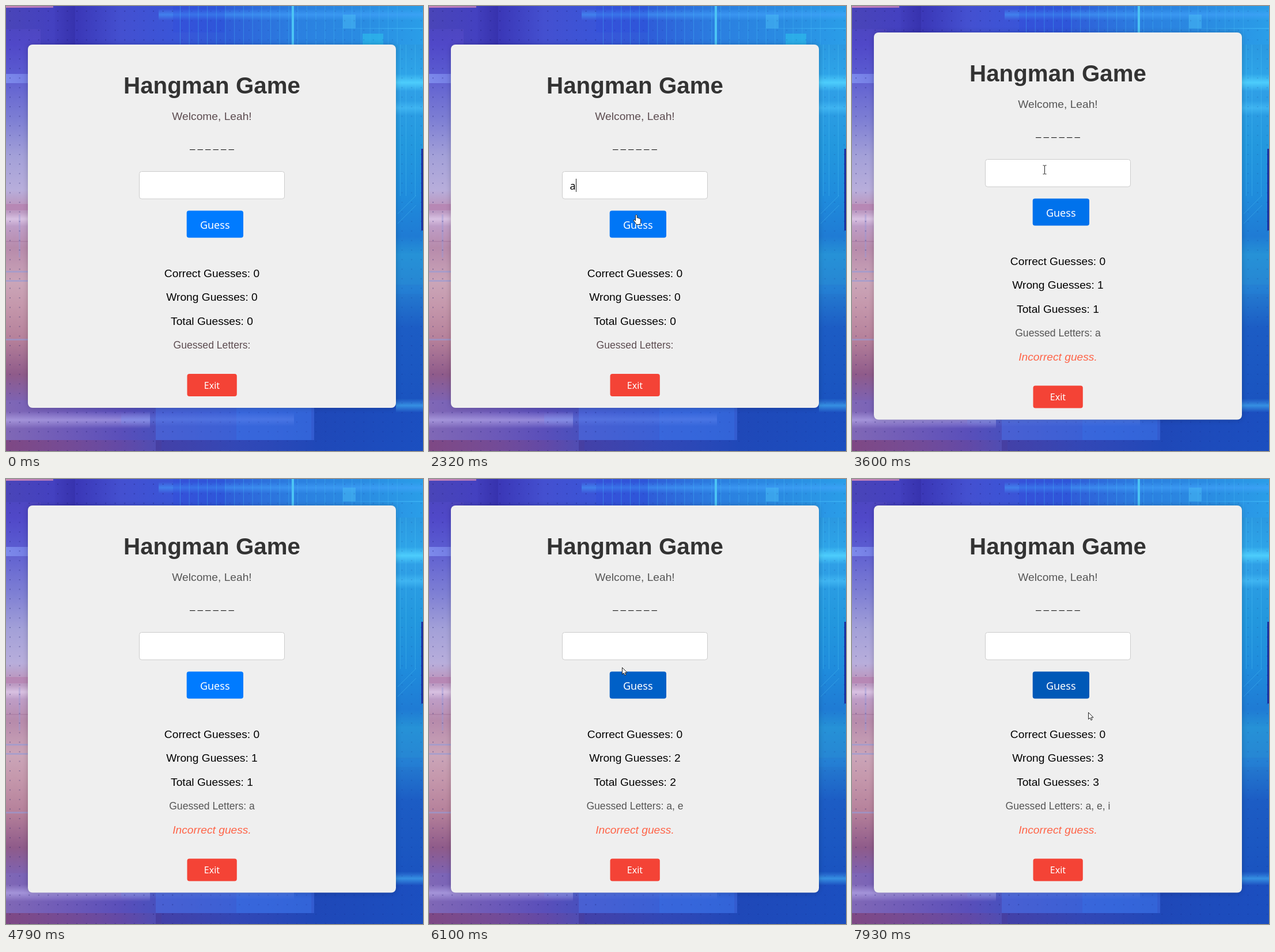
An HTML page with a canvas for the animation above (8000 ms loop, 724 px wide and 773 px high).

```html
<!DOCTYPE html>
<html lang="en">
<head>
<meta charset="utf-8">
<title>Hangman Game</title>
<style>
  html, body { margin: 0; width: 100%; height: 100%; overflow: hidden; background: #2a6fd8; }
  canvas { display: block; }
</style>
</head>
<body>
<canvas id="stage" width="724" height="773"></canvas>
<script>
const W = 724, H = 773, LOOP = 8000, MID = 357.5;
const ARIAL = '"Liberation Sans", Arial, sans-serif';
const UI = '"Noto Sans", "Open Sans", sans-serif';
const stage = document.getElementById('stage').getContext('2d');

// Scene steps: time, typed text, caret, letters guessed so far
const steps = [
  [0, '', 0, ''], [2010, '', 1, ''], [2130, 'a', 1, ''], [2690, '', 0, 'a'],
  [3930, '', 1, 'a'], [4460, '', 0, 'a'], [4880, 'e', 1, 'a'], [5370, '', 0, 'ae'],
  [6570, '', 1, 'ae'], [6840, 'i', 1, 'ae'], [7650, '', 0, 'aei']
];
// Pointer path: time, x, y
const path = [
  [70, 622, 735], [840, 346, 301], [900, 346, 301], [1250, 393, 532], [1670, 366, 318],
  [1800, 366, 318], [1870, 366, 324], [2130, 366, 324], [2320, 359, 362], [2700, 359, 364],
  [3320, 359, 364], [3520, 346, 301], [3700, 319, 262], [3990, 321, 291], [4460, 321, 291],
  [4520, 323, 294], [4950, 323, 294], [5250, 360, 365], [5900, 360, 365], [6100, 335, 327],
  [6640, 331, 303], [7030, 331, 303], [7450, 374, 364], [7720, 374, 364], [7790, 380, 370],
  [7930, 410, 405]
];
const hidden = [[0, 70], [4790, 4950], [6840, 6980]];
const hovers = [[2255, 1], [3400, -1], [5130, 1], [6000, -1], [7240, 1], [7890, -1]];

const clamp = v => Math.max(0, Math.min(1, v));
const smooth = v => { v = clamp(v); return v * v * (3 - 2 * v); };

function gradient(g, x0, y0, x1, y1, stops) {
  const grad = g.createLinearGradient(x0, y0, x1, y1);
  const length = Math.max(x1 - x0, y1 - y0);
  for (const [at, color] of stops) grad.addColorStop(at / length, color);
  return grad;
}

function backdrop() {
  const canvas = document.createElement('canvas');
  canvas.width = W; canvas.height = H;
  const g = canvas.getContext('2d');
  const rect = (x, y, w, h, fill) => { g.fillStyle = fill; g.fillRect(x, y, w, h); };
  // Streak of light that fades from one end to the other
  const streak = (x, y, w, h, rgb, a, b) =>
    rect(x, y, w, h, gradient(g, x, 0, x + w, 0, [[0, `rgba(${rgb},${a})`], [w, `rgba(${rgb},${b})`]]));
  // Horizontal band with soft upper and lower edges
  const glow = (x, y, w, h, rgb, a) =>
    rect(x, y, w, h, gradient(g, 0, y, 0, y + h,
      [[0, `rgba(${rgb},0)`], [h / 2, `rgba(${rgb},${a})`], [h, `rgba(${rgb},0)`]]));

  rect(0, 0, W, H, gradient(g, 0, 0, W, 0, [
    [0, '#4a45b8'], [80, '#4441c0'], [125, '#3b38b8'], [200, '#4450d0'], [290, '#3a55d8'],
    [380, '#2f5cd8'], [500, '#2b7fe0'], [620, '#2a8ce2'], [W, '#2a9ee8']]));
  rect(0, 40, 60, H - 40, gradient(g, 0, 0, 0, H, [
    [0, '#4a45b8'], [67, '#5048c8'], [115, '#5a5ad0'], [200, '#7f80d4'], [260, '#a3a0d8'],
    [320, '#b8aedb'], [345, '#bb98c0'], [380, '#bf9fc8'], [420, '#b78bab'], [480, '#cba5b8'],
    [520, '#c598ac'], [580, '#b5809a'], [640, '#8f5b8a'], [690, '#7c63b5'], [H, '#7a4f85']]));
  rect(660, 67, 64, H - 67, gradient(g, 0, 0, 0, H, [
    [0, '#2a8fe4'], [60, '#2a97e0'], [120, '#2ea4e8'], [150, '#2f9fe6'], [240, '#2398de'],
    [330, '#1f8cdc'], [400, '#1f7bd4'], [430, '#2590d6'], [485, '#2580d2'], [560, '#1c5cc4'],
    [680, '#1a54c0'], [H, '#1b46b4']]));
  rect(0, 685, W, 88, gradient(g, 0, 0, W, 0, [
    [0, '#8068b6'], [100, '#6f5bb8'], [200, '#5a4fba'], [258, '#4a50bd'], [400, '#2f4fc2'],
    [540, '#1f48b8'], [W, '#1b4fc0']]));

  // Upper edge
  streak(0, 0, 82, 3, '215,140,185', .9, .7);
  streak(85, 0, 35, 67, '40,30,140', .05, .25);
  glow(265, 5, 459, 20, '70,165,255', .55);
  rect(290, 0, 90, 46, 'rgba(40,70,220,.25)');
  for (let x = 302; x < 680; x += 15.7) rect(x, 0, 1, 67, 'rgba(70,185,245,.42)');
  rect(496, 0, 4, 67, '#4cc4f4');
  rect(585, 15, 22, 24, 'rgba(75,190,245,.5)');
  rect(619, 48, 36, 19, 'rgba(45,185,235,.7)');
  streak(560, 38, 164, 2, '70,190,250', 0, .5);

  // Left edge
  streak(0, 118, 40, 16, '140,160,250', .65, .45);
  rect(0, 344, 40, 11, 'rgba(180,120,170,.5)');
  glow(0, 358, 40, 24, '225,205,235', .75);
  rect(0, 408, 40, 2, 'rgba(160,110,150,.4)');
  rect(22, 362, 3, 75, 'rgba(150,150,215,.4)');
  for (const y of [460, 476, 578]) rect(0, y, 38, 3, 'rgba(150,155,215,.6)');

  // Right edge
  glow(677, 118, 47, 30, '80,210,255', .9);
  glow(677, 164, 47, 26, '75,195,250', .6);
  rect(677, 430, 47, 54, 'rgba(40,150,215,.25)');
  rect(677, 486, 47, 14, 'rgba(35,130,215,.4)');
  glow(677, 682, 47, 24, '60,160,235', .8);
  rect(721, 248, 3, 142, '#1b2fa0');
  g.strokeStyle = 'rgba(80,200,245,.35)';
  g.lineWidth = 1;
  g.beginPath();
  for (const x of [684.5, 694.5, 710.5]) { g.moveTo(x, 67); g.lineTo(x, 330); }
  for (const y of [345, 362]) { g.moveTo(680, y + 16); g.lineTo(712, y - 16); }
  g.stroke();

  // Lower edge
  glow(0, 704, 250, 30, '195,185,245', .55);
  rect(260, 698, 275, 56, 'rgba(75,115,235,.45)');
  rect(400, 698, 130, 56, 'rgba(50,120,235,.3)');
  glow(200, 706, 300, 24, '110,145,245', .35);
  streak(0, 754, 270, 19, '125,55,105', .65, .1);
  streak(260, 754, 280, 19, '60,45,140', .45, 0);

  for (let y = 8; y < H; y += 16.6)
    for (let x = 6; x < W; x += 16.6)
      rect(x, y, 2, 2, `rgba(20,20,100,${x < 300 ? .3 : .13})`);
  return canvas;
}

function box(x, y, w, h, r, fill, stroke) {
  stage.beginPath();
  stage.roundRect(x, y, w, h, r);
  stage.fillStyle = fill;
  stage.fill();
  if (stroke) { stage.strokeStyle = stroke; stage.lineWidth = 1; stage.stroke(); }
}

function text(str, x, y, font, color, align = 'center') {
  stage.font = font;
  stage.textAlign = align;
  stage.fillStyle = color;
  stage.fillText(str, x, y);
}

const arrow = new Path2D('M.5 .5V12.3L3.2 9.9L5 14L7 13.1L5.2 9.2H9Z');
const hand = new Path2D('M3.5 1.5Q5 -.5 6.2 1.5V6Q8 5 8.6 6.8Q10.2 6 10.8 7.6Q12.5 7.2 12.6 9V12Q12.4 15 11 17.5H5Q3.5 14 .2 11Q-.3 9 1.6 9.2L3.5 11Z');
const beam = new Path2D('M-3 -7.5H-1Q0 -7.5 0 -6.5Q0 -7.5 1 -7.5H3M0 -6.5V6.5M-3 7.5H-1Q0 7.5 0 6.5Q0 7.5 1 7.5H3');

function pointer(t, top) {
  if (hidden.some(([a, b]) => t >= a && t < b)) return;
  let i = path.findIndex(p => p[0] > t);
  if (i < 0) i = path.length - 1;
  const [t0, x0, y0] = path[i - 1], [t1, x1, y1] = path[i];
  const k = smooth((t - t0) / (t1 - t0));
  const x = x0 + (x1 - x0) * k, y = y0 + (y1 - y0) * k;
  const inside = (l, u, w, h) => x >= l && x <= l + w && y >= u && y <= u + h;
  stage.save();
  stage.translate(x, y);
  stage.lineWidth = 1;
  stage.strokeStyle = '#222';
  if (inside(231, top + 220, 253, 49)) stage.stroke(beam);
  else {
    const onButton = inside(314, top + 288, 98, 48);
    const shape = onButton ? hand : arrow;
    if (onButton) stage.translate(-4, 0);
    stage.fillStyle = '#fff';
    stage.fill(shape);
    stage.stroke(shape);
  }
  stage.restore();
}

const scenery = backdrop();

function draw(t) {
  const [, typed, caret, guessed] = steps.filter(s => s[0] <= t).pop();
  const count = guessed.length, top = count ? 46 : 67;
  const soft = count ? '#555' : '#5c4c50';
  const line = (str, y, size, color, style = '') =>
    text(str, MID, top + y, `${style} ${size}px ${ARIAL}`, color);

  stage.drawImage(scenery, 0, 0);
  stage.save();
  stage.shadowColor = 'rgba(0,0,0,.2)';
  stage.shadowBlur = 10;
  box(38, top, 639, count ? 672.5 : 631, 8, '#efefef');
  stage.restore();

  line('Hangman Game', 84.5, 40.3, '#333', 'bold');
  line('Welcome, Leah!', 131, 19.2, soft);
  line('_ _ _ _ _ _', 180, 16.2, '#111');

  box(231.5, top + 220.5, 252, 47.5, 4, '#fff', '#ccc');
  text(typed, 244.5, top + 251.5, `18px ${UI}`, '#000', 'left');
  if (caret) {
    const x = Math.round(244.5 + stage.measureText(typed).width);
    stage.fillStyle = '#222';
    stage.fillRect(x, top + 233, 1, 23);
  }

  const hover = hovers.reduce((sum, [at, sign]) => sum + sign * smooth((t - at) / 300), 0);
  box(313.7, top + 288.5, 98.3, 47, 4, `rgb(0,${123 - 37 * hover},${255 - 76 * hover})`);
  text('Guess', 362.7, top + 319.5, `18px ${UI}`, '#fff');

  line('Correct Guesses: 0', 403.5, 19.2, '#000');
  line('Wrong Guesses: ' + count, 445, 19.2, '#000');
  line('Total Guesses: ' + count, 486.5, 19.2, '#000');
  line('Guessed Letters:' + (count ? ' ' + [...guessed].join(', ') : ''), 527.5, 17.6, soft);
  if (count) line('Incorrect guess.', 570, 19.2, '#ff6347', 'italic');

  const exit = count ? 613.5 : 572;
  box(314.5, top + exit, 86.3, 39, 4, '#f44336');
  text('Exit', MID, top + exit + 25.5, `16px ${UI}`, '#fff');

  pointer(t, top);
}

const start = performance.now();
function tick() {
  draw((performance.now() - start) % LOOP);
  requestAnimationFrame(tick);
}
tick();
</script>
</body>
</html>
```
